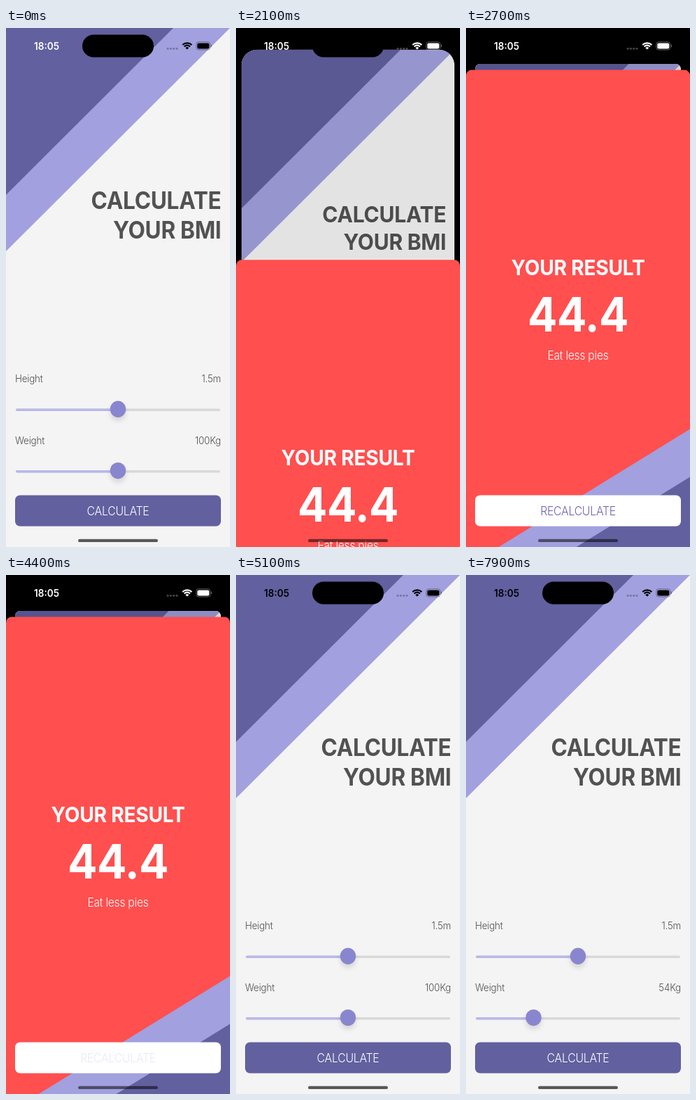
An HTML page with a canvas for the animation above (8000 ms loop, 320 by 737 pixels).

```html
<!DOCTYPE html>
<html lang="en">
<head>
<meta charset="utf-8">
<title>BMI calculator</title>
<style>
  html, body { margin: 0; width: 100%; height: 100%; overflow: hidden; background: #000; }
  canvas { display: block; width: 320px; height: 737px; }
</style>
</head>
<body>
<canvas id="stage"></canvas>
<script>
const W = 320, H = 737, LOOP = 8000, STEP = 100;
const KX = W / 393, KY = H / 852;   // points to stage pixels
const SHEET_TOP = 59;
const DARK = '#62609f', LIGHT = '#a2a0de', PAPER = '#f4f4f4', INK = '#525252', RED = '#ff4f4f';
const TRACKING = { 300: -0.016, 350: -0.016, 600: 0, 700: -0.009 };   // em, by weight

const canvas = document.getElementById('stage');
const ctx = canvas.getContext('2d');
const dpr = window.devicePixelRatio || 1;
canvas.width = W * dpr;
canvas.height = H * dpr;

const lerp = (a, b, k) => a + (b - a) * k;
const clamp = v => Math.max(0, Math.min(1, v));

// Critically damped spring from 0 to 1
function spring(ms) {
  const x = Math.max(0, ms) / 1000 * 17.5;
  return 1 - (1 + x) * Math.exp(-x);
}

function keyed(t, keys) {
  let [t0, v0] = keys[0];
  for (const [t1, v1] of keys) {
    if (t < t1) return lerp(v0, v1, clamp((t - t0) / (t1 - t0)));
    [t0, v0] = [t1, v1];
  }
  return v0;
}

function weightAt(t) {
  if (t < 6400) return 100;
  return keyed(t, [[6400, 94], [7200, 66.5], [7400, 62], [7500, 62], [7900, 54]]);
}

// Title opacity of a button touched at the given time
function touch(t, at) {
  return t < at ? 1 : lerp(0.15, 1, clamp((t - at - 90) / 250));
}

function poly(color, ...pts) {
  ctx.fillStyle = color;
  ctx.beginPath();
  for (const [x, y] of pts) ctx.lineTo(x, y);
  ctx.fill();
}

function box(x, y, w, h, r, color) {
  ctx.fillStyle = color;
  ctx.beginPath();
  ctx.roundRect(x, y, w, h, r);
  ctx.fill();
}

// y is the middle of the capitals, size is in points
function text(str, x, y, size, weight, color, align = 'left', alpha = 1) {
  ctx.save();
  ctx.translate(x, y);
  ctx.scale(KX, KY);
  ctx.globalAlpha *= alpha;
  ctx.font = `${weight} ${size}px Inter, Roboto, sans-serif`;
  ctx.letterSpacing = `${TRACKING[weight] * size}px`;
  ctx.textAlign = align;
  ctx.fillStyle = color;
  ctx.fillText(str, 0, size * 0.364);
  ctx.restore();
}

function slider(y, x) {
  box(14, y - 0.7, 292, 3.6, 1.8, '#d9d9d9');
  box(14, y - 0.7, x - 14, 3.6, 1.8, '#bab8e7');
  ctx.save();
  ctx.shadowColor = 'rgba(0,0,0,0.12)';
  ctx.shadowBlur = 7 * dpr;
  ctx.shadowOffsetY = 5 * dpr;
  ctx.fillStyle = '#8986cf';
  ctx.beginPath();
  ctx.ellipse(x, y, 11.2, 11.7, 0, 0, Math.PI * 2);
  ctx.fill();
  ctx.restore();
}

function home(t) {
  const kg = weightAt(t);
  ctx.fillStyle = PAPER;
  ctx.fillRect(0, 0, W, H);
  poly(LIGHT, [0, 0], [320, 0], [0, 317]);
  poly(DARK, [0, 0], [239, 0], [0, 237]);
  text('CALCULATE', 307.4, 245.2, 38.8, 700, INK, 'right');
  text('YOUR BMI', 307.4, 286.4, 38.8, 700, INK, 'right');
  text('Height', 13, 497.8, 16.5, 300, INK);
  text('1.5m', 307, 497.8, 16.5, 300, INK, 'right');
  slider(541.2, 160);
  text('Weight', 13, 585.5, 16.5, 300, INK);
  text(Math.round(kg) + 'Kg', 307, 585.5, 16.5, 300, INK, 'right');
  slider(628.6, 160 + (kg - 100) * 1.38);
  box(13, 663.5, 294, 44, 7, DARK);
  text('CALCULATE', 160, 686, 19.4, 350, '#fff', 'center', touch(t, 1900));
}

// The home screen shrinks into a dimmed card as p goes to 1
function homeCard(t, p) {
  ctx.save();
  if (p > 0.001) {
    const s = 1 - 0.081 * p;
    ctx.translate(160 * (1 - s), 51 * p);
    ctx.scale(s, s);
    ctx.beginPath();
    ctx.roundRect(0, 0, W, H, lerp(48, 8, p));
    ctx.clip();
  }
  home(t);
  ctx.fillStyle = `rgba(0,0,0,${0.12 * p})`;
  ctx.fillRect(0, 0, W, H);
  ctx.restore();
}

function sheet(t, p) {
  const foot = p > 0.998 ? 0 : 70;
  ctx.save();
  ctx.translate(0, (1 - p) * (H - SHEET_TOP));
  ctx.beginPath();
  ctx.roundRect(0, SHEET_TOP + 0.5, W, H - SHEET_TOP, [8, 8, foot, foot]);
  ctx.clip();
  ctx.fillStyle = RED;
  ctx.fillRect(0, SHEET_TOP, W, H);
  poly(LIGHT, [320, 569.5], [320, 738], [45, 738]);
  poly(DARK, [320, 637.5], [320, 738], [156, 738]);
  text('YOUR RESULT', 160, 340, 34.6, 700, '#fff', 'center');
  text('44.4', 160, 406.5, 77.2, 700, '#fff', 'center');
  text('Eat less pies', 160, 465, 19.2, 300, '#fff', 'center');
  box(13, 663.5, 294, 44, 7, '#fff');
  text('RECALCULATE', 160, 686, 19.4, 350, '#6c62b5', 'center', touch(t, 4400));
  ctx.restore();
}

function statusBar(t, p) {
  const rgb = p > 0.5 ? '255,255,255' : '0,0,0';
  const solid = `rgb(${rgb})`, faint = `rgba(${rgb},0.28)`;
  box(109, 9.5, 102, 32, 16, '#000');
  text('18:05', 58, 25.6, 16.6, 600, t < 5000 ? '#fff' : '#000', 'center');

  for (let i = 0; i < 4; i++) box(229.6 + i * 4.3, 27.8, 3, 3, 1.5, faint);

  const cx = 258.8, cy = 30.6, from = -Math.PI * 0.75, to = -Math.PI * 0.25;
  ctx.strokeStyle = ctx.fillStyle = solid;
  ctx.lineWidth = 2.2;
  for (const r of [9.3, 5.9]) {
    ctx.beginPath();
    ctx.arc(cx, cy, r, from, to);
    ctx.stroke();
  }
  ctx.beginPath();
  ctx.moveTo(cx, cy);
  ctx.arc(cx, cy, 3.5, from, to);
  ctx.fill();

  ctx.strokeStyle = `rgba(${rgb},0.4)`;
  ctx.lineWidth = 0.9;
  ctx.beginPath();
  ctx.roundRect(271.8, 19.8, 20, 11.2, 3.4);
  ctx.stroke();
  box(273.3, 21.4, 17, 8, 2.2, solid);
  box(292.9, 23.6, 1.1, 3.6, 0.5, `rgba(${rgb},0.4)`);
}

function draw(t) {
  const p = spring(t - 1984) - spring(t - 4491);
  const modal = p > 0.0005;
  ctx.setTransform(dpr, 0, 0, dpr, 0, 0);
  ctx.fillStyle = '#000';
  ctx.fillRect(0, 0, W, H);
  homeCard(t, p);
  if (modal) sheet(t, p);
  statusBar(t, p);
  box(103, 725.7, 114, 4.4, 2.2, `rgba(0,0,0,${modal ? 0.53 : 0.64})`);
}

const start = performance.now();
function tick() {
  const t = (performance.now() - start) % LOOP;
  draw(Math.floor(t / STEP) * STEP);
  requestAnimationFrame(tick);
}
tick();
</script>
</body>
</html>
```
